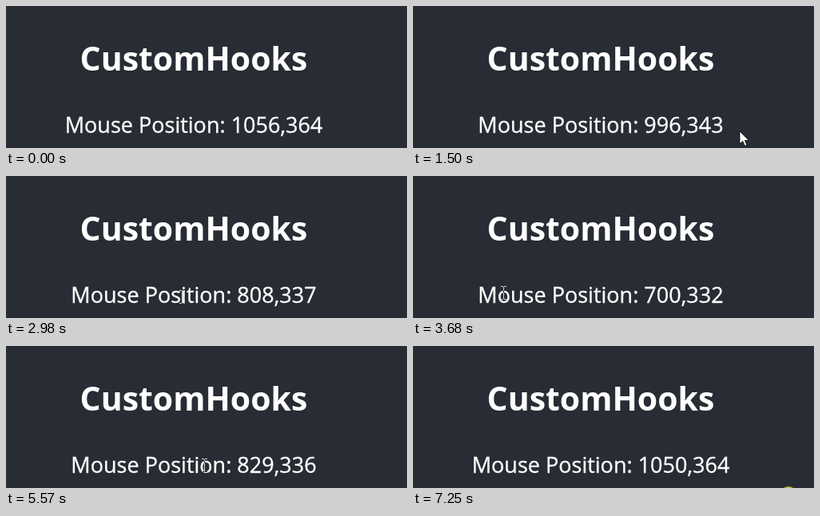
These frames come from a looping animation (502 px wide and 178 px high, 7.38 s). An HTML page:

```html
<!DOCTYPE html>
<html lang="en">
<head>
<meta charset="utf-8">
<title>CustomHooks</title>
<style>
  html, body { margin: 0; height: 100%; overflow: hidden; background: #282c34; }
  svg { display: block; width: 502px; height: 178px; background: #282c34; }
  text { fill: #fff; text-anchor: middle; font-family: "Open Sans", "Noto Sans", sans-serif; }
  #title { font-size: 41px; font-weight: 700; }
  #label { font-size: 27px; stroke: #fff; stroke-width: .35; }
  #beam { fill: none; stroke: #fff; mix-blend-mode: difference; }
  #arrow { fill: #fff; stroke: #000; stroke-width: .8; }
</style>
</head>
<body>
<svg viewBox="0 0 502 178">
  <rect width="502" height="178" fill="#282c34"/>
  <text id="title" x="235" y="81">CustomHooks</text>
  <text id="label" x="235" y="158.5"></text>
  <path id="beam" d="M-3 -7.5H0M1 -7.5H4M.5 -7V8M-3 8.5H0M1 8.5H4"/>
  <path id="arrow" d="M0 0V16L3.8 12.5L6.4 18.4L9 17.3L6.5 11.6H11.5Z"/>
  <circle id="spot" cx="470" cy="186" r="10" fill="#b5b436"/>
</svg>
<script>
  const LOOP = 7380, LAST_STEP = 91;
  const [label, beam, arrow, spot] =
    ["label", "beam", "arrow", "spot"].map(id => document.getElementById(id));

  // Turns of the mouse: up onto the stage, left past the label, back and out.
  const turns = [
    { step: -1, x: 1056, y: 364 },
    { step: 4, x: 1054, y: 344 },
    { step: 23, x: 916, y: 342 },
    { step: 43, x: 700, y: 332 },
    { step: 51, x: 639, y: 330 },
    { step: 59, x: 688, y: 331 },
    { step: 81, x: 970, y: 340 },
    { step: LAST_STEP, x: 1050, y: 364 }
  ];

  // The mouse enters in short steps, rests, then moves on until it leaves.
  function stepAt(t) {
    if (t < 460) return -1;
    if (t < 940) return Math.min(4, Math.floor((t - 460) / 70));
    return Math.min(LAST_STEP, 4 + Math.floor((t - 932) / 70.23));
  }

  function mouseAt(step) {
    const i = Math.max(1, turns.findIndex(turn => turn.step >= step));
    const a = turns[i - 1], b = turns[i];
    const f = (step - a.step) / (b.step - a.step);
    return { x: a.x + (b.x - a.x) * f, y: a.y + (b.y - a.y) * f };
  }

  function show(node, visible) {
    node.setAttribute("visibility", visible ? "visible" : "hidden");
  }

  function draw(t) {
    const step = stepAt(t), mouse = mouseAt(step);
    label.textContent = `Mouse Position: ${Math.round(mouse.x)},${Math.round(mouse.y)}`;

    // The pointer runs slightly ahead of the printed position.
    const x = Math.round(mouseAt(Math.min(LAST_STEP, step + .3)).x - 584.5);
    const y = Math.round(mouse.y - 186.5);
    const onStage = mouse.y < 364, overText = x > 78 && x < 390;
    for (const node of [beam, arrow]) node.setAttribute("transform", `translate(${x} ${y})`);
    show(beam, onStage && overText);
    show(arrow, onStage && !overText);
    show(spot, t >= 7250);
  }

  const start = performance.now();
  function tick() {
    draw((performance.now() - start) % LOOP);
    requestAnimationFrame(tick);
  }
  tick();
</script>
</body>
</html>
```
